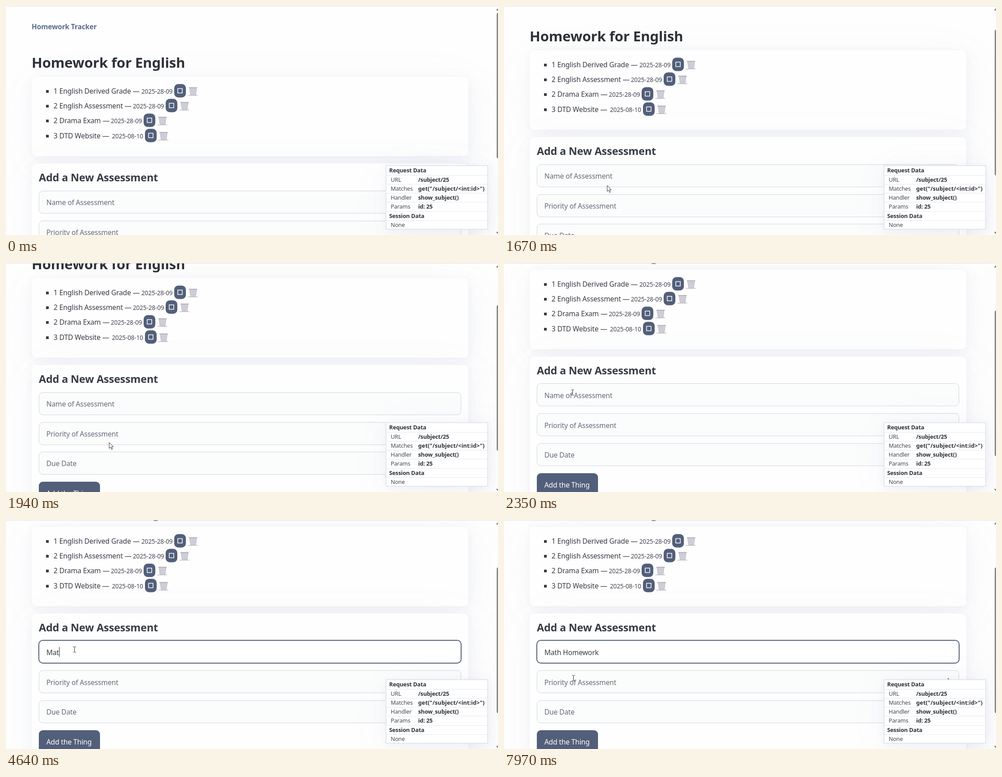
An HTML page for the animation above (8000 ms loop, 1094 by 512 pixels).

```html
<!DOCTYPE html>
<html lang="en">
<head>
<meta charset="utf-8">
<title>Homework list</title>
<style>
  html, body { margin: 0; width: 100%; height: 100%; overflow: hidden; background: #fefefe; }
  #stage {
    position: relative; width: 1094px; height: 512px; overflow: hidden;
    font-family: "Noto Sans", "Open Sans", sans-serif; letter-spacing: -.01em;
    --shadow: 0 0 0 1px #8191b504, 1px 2px 12px #8191b508, 2px 4px 22px #8191b509,
      3px 7px 41px #8191b50b, 8px 17px 100px #8191b50f;
  }
  #stage div, #stage svg { position: absolute; box-sizing: border-box; }
  svg { overflow: visible; left: 0; top: 0; }
  .card { left: 57px; width: 971px; border-radius: 11px; background: #fefefe; box-shadow: var(--shadow); }
  .field { left: 73px; width: 939px; height: 51px; border: 1px solid #cfd5e2; border-radius: 9px; background: #fbfcfc; }
  .field.focus { border-color: #525f7a; background: #fff; box-shadow: 0 0 0 1px #525f7a; }
  #add { left: 73px; top: 613.3px; width: 136px; height: 51px; border-radius: 9px; background: #525f7a; }
  text { font-size: 15.6px; fill: #373c44; white-space: pre; }
  .bold { font-weight: 700; }
  .brand { font-size: 15.5px; fill: #5d6b89; }
  .h1 { font-size: 31.1px; fill: #2d3138; }
  .h2 { font-size: 23.3px; }
  .date { font-size: 13.6px; fill: #424751; }
  .hint { fill: #646b79; }
  .light { fill: #fff; }
  #menu { left: 152px; top: 328px; width: 149px; height: 123px; border-radius: 6px; background: #fff;
    box-shadow: 0 0 1px #0006, 0 1px 5px #0003; }
  #menu text { font-size: 10.4px; font-weight: 600; letter-spacing: -.035em; fill: #1b1b1f; }
  #panel { left: 844px; top: 356px; width: 228px; height: 144px; border: 2px solid #e4e7ee; background: #fff;
    box-shadow: var(--shadow); }
  #panel text { font-size: 12.6px; fill: #424751; }
  #panel .bold { fill: #2d3138; }
  #panel .wide { letter-spacing: .009em; }
  #thumb { left: 1091px; top: 15px; width: 8px; height: 326px; border-radius: 4px; background: #8a8a8a; }
  #topline { left: 0; top: 0; width: 1094px; height: 1px; background: #e0e0e2; }
</style>
</head>
<body>
<div id="stage">
  <div id="page">
    <div class="card" style="top:158px;height:178px"></div>
    <div class="card" style="top:352px;height:400px"></div>
    <div class="field" id="name" style="top:412.5px"></div>
    <div class="field" style="top:479.5px"></div>
    <div class="field" style="top:546.3px"></div>
    <div id="add"></div>
    <svg width="1094" height="760">
      <defs>
        <pattern id="mesh" width="3" height="3" patternUnits="userSpaceOnUse">
          <rect width="3" height="3" fill="#e2e0e7"/>
          <path d="M0 0L3 3M3 0L0 3" stroke="#b3b0bd" stroke-width=".7"/>
        </pattern>
        <g id="bin">
          <path d="M3.500 2H19.500L17.500 18H6Z" fill="url(#mesh)" stroke="#b7b4c0" stroke-width=".8"/>
          <path d="M2 1.500H21" stroke="#adaab7" stroke-width="1.600"/>
          <path d="M0 18.800H22" stroke="#b5b2be" stroke-width="1.200"/>
        </g>
        <g id="tick">
          <rect width="26" height="30" rx="9" fill="#525f7a"/>
          <rect x="8" y="10" width="10" height="10" fill="none" stroke="#fff" stroke-width="1.500"/>
        </g>
      </defs>
      <text class="bold brand" x="57" y="52">Homework Tracker</text>
      <text class="bold h1" x="57" y="138">Homework for English</text>
      <g id="tasks"></g>
      <text class="bold h2" x="73" y="391.500">Add a New Assessment</text>
      <text class="hint" id="nameHint" x="89.700" y="444.600">Name of Assessment</text>
      <text id="typed" x="89.700" y="444.600"></text>
      <text class="hint" x="89.700" y="511.600">Priority of Assessment</text>
      <text class="hint" x="89.700" y="578.300">Due Date</text>
      <text class="light" x="89.700" y="645">Add the Thing</text>
      <rect id="caret" y="427" width="1" height="22" fill="#222"/>
      <path id="spinner" d="M984.500 501L988 496L991.500 501Z" fill="#666"/>
    </svg>
  </div>
  <div id="menu">
    <svg width="149" height="123"><path d="M11 .5L16-4L21 .5Z" fill="#fff"/><g id="options"></g></svg>
  </div>
  <div id="panel"><svg id="info" width="224" height="140"></svg></div>
  <div id="thumb"></div>
  <svg width="1094" height="512">
    <path d="M1089.500 10L1093 5.500L1096.500 10ZM1089.500 505L1093 509.500L1096.500 505Z" fill="#858585"/>
    <path id="arrow" d="M.5 .5V13.500L3.600 10.700L5.700 15.800L7.800 14.900L5.700 9.900H9.800Z" fill="#fff" stroke="#222" stroke-width=".9"/>
    <path id="beam" d="M-3 -6H-.8L0 -5.300L.8 -6H3M0 -5.300V5.300M-3 6H-.8L0 5.300L.8 6H3" fill="none" stroke="#222"/>
  </svg>
  <div id="topline"></div>
</div>
<script>
  const $ = id => document.getElementById(id);
  const show = (el, on) => el.style.visibility = on ? "visible" : "hidden";
  const text = (x, y, str, cls = "") =>
    `<text x="${x}" y="${y}" class="${cls}">${str.replace(/</g, "&lt;")}</text>`;

  const tasks = [
    ["1 English Derived Grade —", "2025-28-09", 301],
    ["2 English Assessment —", "2025-28-09", 282],
    ["2 Drama Exam —", "2025-28-09", 233],
    ["3 DTD Website —", "2025-08-10", 235.5],
  ];
  $("tasks").innerHTML = tasks.map(([label, date, x], i) => {
    const y = 196 + Math.round(33.2 * i);
    return `<rect x="89" y="${y - 8}" width="6" height="6" fill="#373c44"/>`
      + text(105.8, y, label) + text(x, y, date, "date")
      + `<use href="#tick" x="${Math.round(x + 73)}" y="${y - 21.5}"/><use href="#bin" x="${x + 103.5}" y="${y - 15}"/>`;
  }).join("");

  $("options").innerHTML = ["English Derived Grade", "DTD Website", "English Assessment", "Drama Exam"]
    .map((label, i) => text(10.7, 21.6 + 29.2 * i, label)).join("");

  const info = [["Request Data"], ["URL", "/subject/25"], ["Matches", 'get("/subject/<int:id>")'],
    ["Handler", "show_subject()"], ["Params", "id: 25"], ["Session Data"], ["None", ""]];
  $("info").innerHTML = info.map(([key, value], i) => {
    const y = 14.3 + 20.25 * i;
    const line = i ? `<path d="M0 ${Math.round(y - 15) + .5}H224" stroke="#e5e8ef"/>` : "";
    return line + (value === undefined
      ? text(6, y, key, "bold")
      : text(9.5, y, key) + text(70.5, y, value, key === "Matches" ? "bold wide" : "bold"));
  }).join("");

  // Step tracks: [time, value...], each held until the next entry.
  const scroll = [[0, 0], [1530, 2], [1600, 24], [1670, 59], [1740, 88], [1810, 110],
    [1880, 124], [1950, 134], [2020, 140], [2090, 143.3]];
  const pointer = [[0, -50, -50], [390, 981, 500], [460, 875, 486], [530, 770, 478], [800, 645, 450],
    [865, 490, 418], [930, 360, 402], [1190, 285, 402], [1260, 229, 401], [2090, 205, 360],
    [2160, 178, 318], [2220, 158, 295], [2280, 152.5, 289.5], [7690, 152.5, 296], [7760, 153, 312],
    [7830, 154, 333], [7900, 154.5, 348], [7970, 154.5, 353.5]];
  const typing = [[0, ""], [4100, "M"], [4360, "Ma"], [4640, "Mat"], [4920, "Math"], [5190, "Math "],
    [5400, "Math H"], [5470, "Math Ho"], [5670, "Math Hoo"], [5930, "Math Ho"], [6100, "Math H"],
    [6350, "Math Ho"], [6470, "Math Hom"], [6610, "Math Home"], [6810, "Math Homew"],
    [6880, "Math Homewo"], [7020, "Math Homewor"], [7080, "Math Homework"]];
  const caret = [[0, 0], [2970, 1], [3300, 0], [3830, 1], [7620, 0]];
  const at = (track, t) => track.findLast(step => step[0] <= t).slice(1);

  function draw(t) {
    const [offset] = at(scroll, t), [x, y] = at(pointer, t), [str] = at(typing, t);
    $("page").style.top = -offset + "px";
    $("thumb").style.top = 15 + offset * .637 + "px";
    $("name").classList.toggle("focus", t >= 2970);
    show($("menu"), t >= 3050 && t < 4170);

    $("typed").textContent = str;
    show($("nameHint"), !str);
    $("caret").setAttribute("x", 90 + Math.round(str ? $("typed").getComputedTextLength() : 0));
    show($("caret"), at(caret, t)[0]);
    show($("spinner"), t >= 7830);

    const beam = t >= 2160;
    show($("beam"), beam);
    show($("arrow"), !beam);
    $(beam ? "beam" : "arrow").setAttribute("transform", `translate(${x} ${y})`);
  }

  const start = performance.now();
  function tick(now) {
    draw(Math.max(0, now - start) % 8000);
    requestAnimationFrame(tick);
  }
  tick(start);
</script>
</body>
</html>
```
